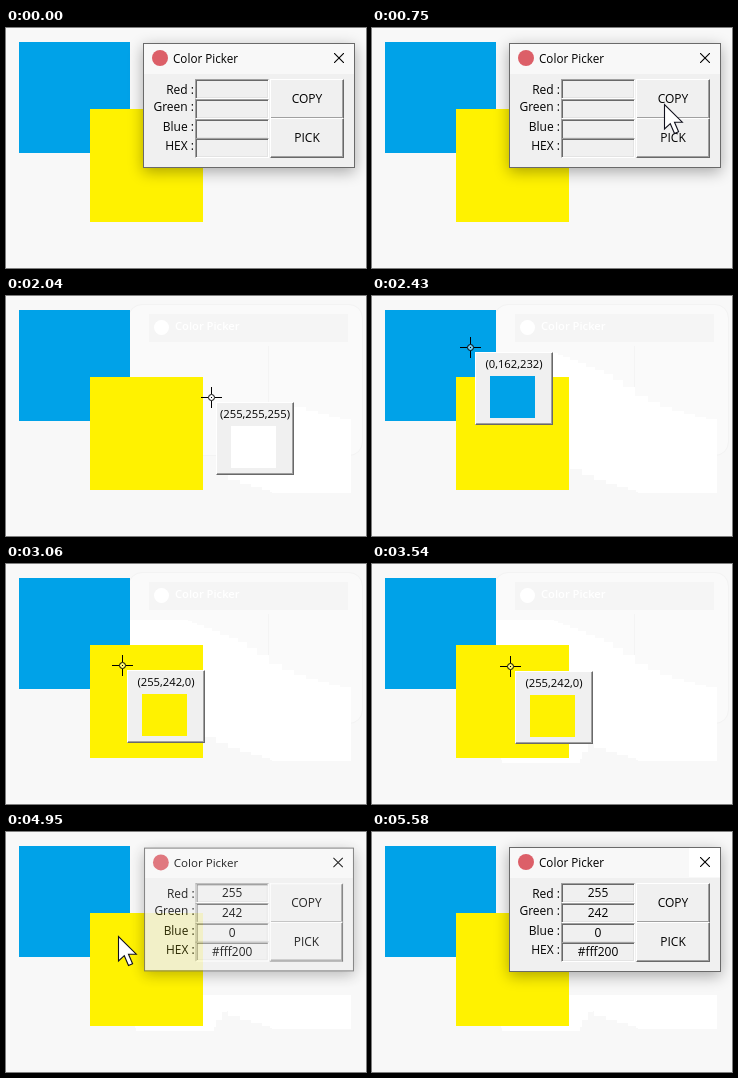
An HTML page for the animation above (5760 ms loop, 360 by 240 pixels).

```html
<!DOCTYPE html>
<html lang="en">
<head>
<meta charset="utf-8">
<title>Color Picker</title>
<style>
  html, body { margin: 0; width: 100%; height: 100%; overflow: hidden; background: #f8f8f8; }
  #stage { position: absolute; left: 0; top: 0; width: 360px; height: 240px; overflow: hidden;
    font: 12px/16px "Open Sans", "Noto Sans", sans-serif; color: #000; }
  #stage div, #stage svg { position: absolute; box-sizing: border-box; white-space: nowrap; }
  .layer { left: 0; top: 0; width: 360px; height: 240px; }

  #blue { left: 13px; top: 14px; width: 111px; height: 111px; background: #00a2e8; }
  #yellow { left: 84px; top: 81px; width: 113px; height: 113px; background: #fff200; }

  .halo { left: 122px; top: 8px; width: 235px; height: 152px; border: 1px solid #f3f3f3;
    border-radius: 14px; background: #fafafa; }
  .band { left: 143px; top: 18px; width: 199px; height: 28px; background: #f5f5f5; }
  .dot { left: 148px; top: 24px; width: 15px; height: 15px; border-radius: 50%; background: #fff; }
  .name { left: 169px; top: 22px; color: #fff; font-weight: 600; font-size: 11.2px; }
  .rule { left: 262px; top: 50px; width: 1px; height: 72px; background: #f4f4f4; }
  #trail div { width: 78px; height: 73px; background: #fff; }
  #patch { left: 122px; top: 5px; width: 238px; height: 158px; background: #f8f8f8; }

  #window { transform-origin: 243px 77px; }
  .frame { left: 137px; top: 15px; width: 212px; height: 125px; border: 1px solid #6a6a6a;
    background: linear-gradient(#f8f8f8 30px, #f0f0f0 30px); box-shadow: 0 4px 14px rgba(0,0,0,.32); }
  .icon { left: 146px; top: 22px; width: 16px; height: 16px; border-radius: 50%; background: #dc5f68; }
  .title { left: 167px; top: 22px; font-size: 11.7px; }
  #close { left: 317px; top: 16px; width: 31px; height: 29px; }
  #close svg { left: 11px; top: 9px; }
  .label { left: 137px; width: 51px; text-align: right; }
  .entry { left: 189px; width: 74px; height: 20px; text-align: center; line-height: 18px;
    border: 1px solid; border-color: #a0a0a0 #fff #fff #a0a0a0;
    box-shadow: inset 1px 1px #696969, inset -1px -1px #e3e3e3; }
  .button { left: 264px; width: 74px; height: 40px; line-height: 38px; text-align: center; background: #f0f0f0; }
  .raised { border: 1px solid; border-color: #fff #696969 #696969 #fff; box-shadow: inset -1px -1px #a0a0a0; }
  .pressed { border: 1px solid; border-color: #696969 #a0a0a0 #a0a0a0 #696969;
    box-shadow: inset 1px 1px #808080, inset -1px -1px #808080; padding: 1px 0 0 1px; }

  #popup { left: 5px; top: 5px; width: 78px; height: 73px; background: #f0f0f0; }
  #rgb { left: 0; top: 3px; width: 76px; text-align: center; font-size: 11.25px; }
  #swatch { left: 14px; top: 23px; width: 45px; height: 42px; }
  #arrow, #cross { overflow: visible; width: 1px; height: 1px; left: 0; top: 0; }
</style>
</head>
<body>
<div id="stage">
  <div id="ghost" class="layer">
    <div class="halo"></div><div class="band"></div><div class="dot"></div>
    <div class="name">Color Picker</div><div class="rule"></div>
  </div>
  <div id="trail" class="layer"></div>
  <div id="patch"></div>
  <div id="blue"></div>
  <div id="yellow"></div>

  <div id="window" class="layer">
    <div class="frame"></div>
    <div class="icon"></div>
    <div class="title">Color Picker</div>
    <div id="close">
      <svg width="10" height="10"><path d="M0 0L10 10M10 0L0 10" stroke="currentColor" stroke-width="1.1"/></svg>
    </div>
    <div class="label" style="top:54px">Red :</div>
    <div class="label" style="top:71px">Green :</div>
    <div class="label" style="top:91px">Blue :</div>
    <div class="label" style="top:110px">HEX :</div>
    <div class="entry" style="top:51px"></div>
    <div class="entry" style="top:71px"></div>
    <div class="entry" style="top:91px"></div>
    <div class="entry" style="top:110px"></div>
    <div class="button raised" style="top:51px">COPY</div>
    <div id="pick" class="button raised" style="top:90px">PICK</div>
  </div>

  <div id="picker" class="layer" style="overflow:visible">
    <div id="popup" class="raised"><div id="rgb"></div><div id="swatch"></div></div>
    <svg id="cross">
      <circle cx=".5" cy=".5" r="3" fill="#fff" fill-opacity=".45" stroke="#000"/>
      <path d="M-10 .5H-3M4 .5H11M.5 -10V-3M.5 4V11M0 .5H1" stroke="#000"/>
    </svg>
  </div>
  <svg id="arrow">
    <path d="M.5 .5V25L6.3 19.7L10.5 29.5L14.6 27.7L10.5 18.2H18.3Z" fill="#fff" stroke="#10101c" stroke-width="1.1"/>
  </svg>
</div>

<script>
const $ = id => document.getElementById(id);
const LOOP = 5760, STEP = 30;
const PRESS = 1590, HIDE = 1680, PICKER_ON = 1800, PICKED = 4830;

// Pointer path: time, x, y
const path = [
  [0, 368, 43], [60, 368, 43], [300, 295, 64], [630, 295, 64], [990, 282, 110],
  [1710, 282, 110], [1800, 262, 118], [1890, 259, 118], [2040, 205, 101],
  [2160, 158, 73], [2430, 98, 51], [2700, 98, 51], [2820, 96, 55], [3240, 125, 121],
  [3450, 125, 121], [3540, 138, 102], [3810, 174, 46], [4140, 174, 46],
  [4350, 125, 88], [4500, 97, 107], [4860, 97, 107], [5160, 206, 82],
  [5400, 327, 43], [5490, 368, 34], [LOOP, 368, 34]
];

const clamp = v => Math.max(0, Math.min(1, v));
const ramp = (t, from, to) => clamp((t - from) / (to - from));

// Slope at a key; zero next to a pause
function slope(i, axis) {
  const a = path[i - 1], b = path[i], c = path[i + 1];
  if (!a || !c) return 0;
  const still = (p, q) => p[1] === q[1] && p[2] === q[2];
  return still(a, b) || still(b, c) ? 0 : (c[axis] - a[axis]) / (c[0] - a[0]);
}

function pointer(t) {
  let i = 0;
  while (i < path.length - 2 && path[i + 1][0] <= t) i++;
  const a = path[i], b = path[i + 1], d = b[0] - a[0];
  const u = (t - a[0]) / d, u2 = u * u, u3 = u2 * u;
  return [1, 2].map(k => Math.round(
    (2 * u3 - 3 * u2 + 1) * a[k] + (u3 - 2 * u2 + u) * d * slope(i, k) +
    (3 * u2 - 2 * u3) * b[k] + (u3 - u2) * d * slope(i + 1, k)));
}

function colorAt(x, y) {
  const inside = (l, t, size) => x >= l && x < l + size && y >= t && y < t + size;
  if (inside(84, 81, 113)) return "255,242,0";
  if (inside(13, 14, 111)) return "0,162,232";
  return "255,255,255";
}

const move = (el, x, y) => { el.style.transform = `translate(${x}px,${y}px)`; };
const show = (el, on) => { el.style.visibility = on ? "visible" : "hidden"; };

// Cleared area left behind by the popup
const trail = [];
for (let t = PICKER_ON, last = ""; t < PICKED; t += STEP) {
  const [x, y] = pointer(t);
  if (last === x + "," + y) continue;
  last = x + "," + y;
  const el = document.createElement("div");
  move(el, x + 5, y + 5);
  $("trail").append(el);
  trail.push({ t, el });
}

const entries = document.querySelectorAll(".entry");
const values = ["255", "242", "0", "#fff200"];

function render(t) {
  const [x, y] = pointer(t);
  const picking = t >= PICKER_ON && t < PICKED, picked = t >= PICKED;

  show($("ghost"), t >= HIDE);
  show($("patch"), picked);
  trail.forEach(p => show(p.el, t >= p.t));

  const open = picked ? ramp(t, PICKED - STEP, PICKED + 150) : 1 - ramp(t, HIDE, HIDE + 150);
  $("window").style.opacity = open;
  $("window").style.transform = `scale(${0.94 + 0.06 * open})`;
  $("pick").className = "button " + (t >= PRESS && t < PICKED ? "pressed" : "raised");
  entries.forEach((el, i) => { el.textContent = picked ? values[i] : ""; });

  const fade = ramp(t, 5400, 5550);
  const mix = c => Math.round(c + (255 - c) * fade);
  const hovered = t >= 5370;
  $("close").style.background = hovered ? `rgb(${mix(232)},${mix(17)},${mix(35)})` : "none";
  $("close").style.color = hovered && fade < 0.5 ? "#fff" : "#000";

  show($("picker"), picking);
  show($("arrow"), !picking);
  move($("picker"), x, y);
  move($("arrow"), x, y);
  const rgb = colorAt(x, y);
  $("rgb").textContent = `(${rgb})`;
  $("swatch").style.background = `rgb(${rgb})`;
}

const start = performance.now();
function tick() {
  const t = (performance.now() - start) % LOOP;
  render(Math.floor(t / STEP) * STEP);
  requestAnimationFrame(tick);
}
tick();
</script>
</body>
</html>
```
